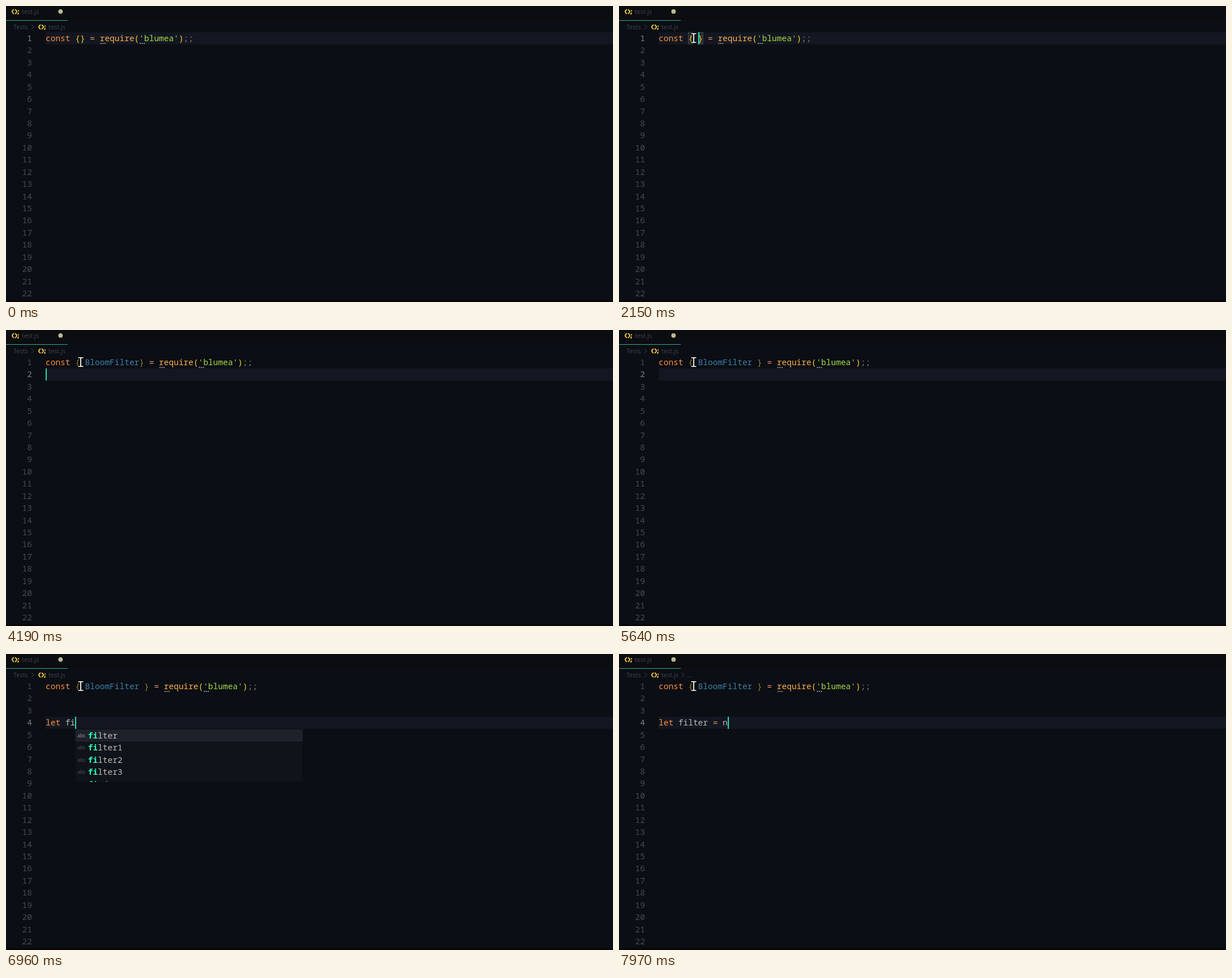
Recreate the animation shown at these times as an HTML page with a canvas. Size 1072 by 522 pixels, loop 8 s.

```html
<!DOCTYPE html>
<html lang="en">
<head>
<meta charset="utf-8">
<title>Editor typing</title>
<style>
html, body { margin: 0; width: 100%; height: 100%; overflow: hidden; background: #0b0e14; }
canvas { display: block; }
</style>
</head>
<body>
<canvas id="stage" width="1072" height="522"></canvas>
<script>
const ctx = document.getElementById('stage').getContext('2d');
const LOOP = 8000, LEFT = 70, TOP = 46.3, CHAR = 8.7, ROW = 21.43;
const MONO = '14.5px "Noto Sans Mono", "DejaVu Sans Mono", monospace';
const UI = '11px "Open Sans", "Noto Sans", sans-serif';
const C = {
  bg: '#0b0e14', line: '#131721', number: '#464b55', active: '#7d828a',
  keyword: '#ff8f40', call: '#ffb050', text: '#bfbdb6', string: '#a6d849',
  bracket: '#ffd02e', dimBracket: '#97831f', type: '#59c2ff', dimType: '#3c80aa',
  faint: '#7f8178', caret: '#25e0ab', match: '#2bffb8', ui: '#41454c', icon: '#f2c94c'
};
const colX = c => LEFT + c * CHAR;
const rowY = r => TOP + (r - 1) * ROW;

// Latest entry of [time, value...] that has started
const at = (list, t) => list.filter(e => e[0] <= t).pop();

const imports = [[0, '{}'], [2150, '{ }'], [2560, '{ BloomFilter}'], [2690, '{ BloomFilter }'],
  [3820, '{ BloomFilter}'], [5030, '{ BloomFilter }']];

// time, row, column, visible
const carets = [[0, 1, 7, 0], [1700, 1, 7, 1], [2150, 1, 8, 1], [2560, 1, 19, 1], [2690, 1, 20, 1],
  [3030, 1, 20, 0], [3530, 1, 20, 1], [3820, 1, 19, 1], [4050, 2, 0, 1], [4560, 1, 19, 1],
  [5030, 1, 20, 1], [5140, 2, 0, 1], [5640, 2, 0, 0], [5960, 3, 0, 1], [6110, 4, 0, 1]];

const typed = 'let filter = n';
const keys = [6330, 6520, 6760, 6800, 6890, 6960, 7050, 7170, 7320, 7370, 7550, 7640, 7730, 7970];

function rect(x, y, w, h, color) {
  ctx.fillStyle = color;
  ctx.fillRect(x, y, w, h);
}

function text(s, x, y, color, font = MONO, weight = 500) {
  ctx.font = weight + ' ' + font;
  ctx.fillStyle = color;
  ctx.fillText(s, x, y);
}

function code(parts, row) {
  let col = 0;
  for (const [s, color] of parts) {
    text(s, colX(col), rowY(row) + 15.7, color);
    col += s.length;
  }
}

function fileIcon(x, y) {
  ctx.strokeStyle = C.icon;
  ctx.lineWidth = 2;
  ctx.beginPath();
  ctx.moveTo(x + 4, y - 4);
  ctx.quadraticCurveTo(x - 2, y, x + 4, y + 4);
  ctx.moveTo(x + 6, y - 4);
  ctx.quadraticCurveTo(x + 12, y, x + 6, y + 4);
  ctx.moveTo(x + 12, y + 1.5);
  ctx.lineTo(x + 11, y + 5);
  ctx.stroke();
  rect(x + 11, y - 2.5, 2, 2, C.icon);
}

function chevron(x, y) {
  ctx.strokeStyle = C.ui;
  ctx.lineWidth = 1;
  ctx.beginPath();
  ctx.moveTo(x, y - 4);
  ctx.lineTo(x + 4, y);
  ctx.lineTo(x, y + 4);
  ctx.stroke();
}

function header(t) {
  rect(0, 0, 1072, 25, '#0b0d10');
  fileIcon(10, 10);
  text('test.js', 28, 14, C.ui, UI, 400);
  ctx.fillStyle = '#bdb990';
  ctx.beginPath();
  ctx.arc(96.3, 9.7, 3.9, 0, 7);
  ctx.fill();
  rect(0, 25, 109, 1, '#35a982');
  text('Tests', 13, 41, C.ui, UI, 400);
  chevron(45, 37);
  fileIcon(57, 37);
  text('test.js', 75, 41, C.ui, UI, 400);
  if (t >= 7320) {
    chevron(111, 37);
    text('...', 120, 41, C.ui, UI, 400);
  }
}

function bracketBox(col) {
  rect(colX(col) + 0.5, TOP, CHAR, 21, '#272b30');
  ctx.strokeStyle = '#44484c';
  ctx.lineWidth = 1;
  ctx.strokeRect(colX(col) + 0.3, TOP + 0.2, CHAR - 0.5, 20.5);
}

function importLine(braces, dim, boxed) {
  const end = 5 + braces.length;
  if (boxed) [6, end].forEach(bracketBox);
  const bracket = dim ? C.dimBracket : C.bracket;
  code([['const ', C.keyword], ['{', bracket], [braces.slice(1, -1), dim ? C.dimType : C.type],
    ['}', bracket], [' = ', '#f29668'], ['require', C.call], ['(', C.bracket],
    ["'blumea'", C.string], [')', C.bracket], [';;', C.faint]], 1);
  for (const col of [end + 4, end + 12])
    for (let i = 0; i < 3; i++) rect(colX(col) + 1 + i * 3.5, 65, 2, 2, '#8b8f91');
}

function popup(x, prefix, words) {
  ctx.save();
  ctx.beginPath();
  ctx.rect(x, 133, 402, 92.5);
  ctx.clip();
  rect(x, 133, 402, 93, '#0f131a');
  rect(x, 133, 402, 21.5, '#1d222b');
  words.forEach((word, i) => {
    const y = 149 + i * ROW;
    text('abc', x + 4, y - 2, i ? '#555a61' : '#a3a5a5', '8.5px "Open Sans", sans-serif', 400);
    text(prefix, x + 22.5, y, C.match, MONO, 700);
    text(word.slice(prefix.length), x + 22.5 + prefix.length * CHAR, y, C.text);
  });
  ctx.restore();
}

function suggestions(t, count) {
  if (t >= 6570 && t < 6800) {
    popup(87, typed.slice(0, count), ['let', 'length', 'left', 'level', 'less']);
    if (t >= 6620) rect(489, 133, 300, 92.5, '#0f131a');
  }
  if (t >= 6960 && t < 7550) {
    const words = ['filter', 'filter1', 'filter2', 'filter3', 'find'];
    const prefix = typed.slice(4, count);
    popup(colX(count), prefix, words.filter(w => w.startsWith(prefix)));
  }
}

// Pointer rests between moves; each move advances in equal time steps
const moves = [
  { start: 40, end: 230, steps: 5, from: [908, 453], to: [462.5, 207.5], lead: 0 },
  { start: 490, end: 1050, steps: 13, from: [462.5, 207.5], to: [137.5, 56.5], lead: 1 },
  { start: 1230, end: 1520, steps: 6, from: [137.5, 56.5], to: [132, 56.5], lead: 1 }
];
const jiggle = [[1700, 137, 52.5], [1790, 122, 55], [1870, 128, 59], [1960, 132, 56.5]];

function pointerAt(t) {
  if (t >= 1700) return at(jiggle, t).slice(1);
  const m = moves.filter(m => m.start <= t).pop();
  if (!m) return null;
  const step = Math.floor((t - m.start) / (m.end - m.start) * (m.steps - 1) + 1e-6);
  const p = Math.min(1, (step + m.lead) / (m.steps - 1 + m.lead));
  const e = 1 - (1 - p) ** 2;
  return m.from.map((v, i) => v + (m.to[i] - v) * e);
}

function pointer([x, y]) {
  for (const [color, grow] of [['#000', 1], ['#fff', 0]]) {
    const bar = (dx, dy, w, h) => rect(x + dx - grow, y + dy - grow, w + 2 * grow, h + 2 * grow, color);
    bar(-4.5, -8.5, 9, 1.6);
    bar(-4.5, 7, 9, 1.6);
    bar(-0.9, -8.5, 1.8, 17);
  }
}

function draw(t) {
  const count = keys.filter(k => k <= t).length;
  let [, row, col, visible] = at(carets, t);
  if (row === 4) col = count;
  const braces = at(imports, t)[1];

  rect(0, 0, 1072, 522, C.bg);
  rect(0, 519, 1072, 3, '#080508');
  header(t);
  rect(LEFT, rowY(row), 1002, 21.4, C.line);

  ctx.textAlign = 'right';
  for (let n = 1; n <= 22; n++) text(n, 46, rowY(n) + 15.7, n === row ? C.active : C.number);
  ctx.textAlign = 'left';

  importLine(braces, t >= 2970, t >= 1700 && row === 1 && col === 5 + braces.length);
  const line = typed.slice(0, count);
  code([[line.slice(0, 3), count < 3 ? C.text : C.keyword], [line.slice(3, 10), C.text],
    [line.slice(10, 13), '#f29668'], [line.slice(13), C.text]], 4);
  suggestions(t, count);
  if (visible) rect(Math.round(colX(col)), rowY(row), 2, 21.4, C.caret);

  const p = pointerAt(t);
  if (p) pointer(p);
}

const begin = performance.now();
function tick() {
  draw((performance.now() - begin) % LOOP);
  requestAnimationFrame(tick);
}
tick();
</script>
</body>
</html>
```
